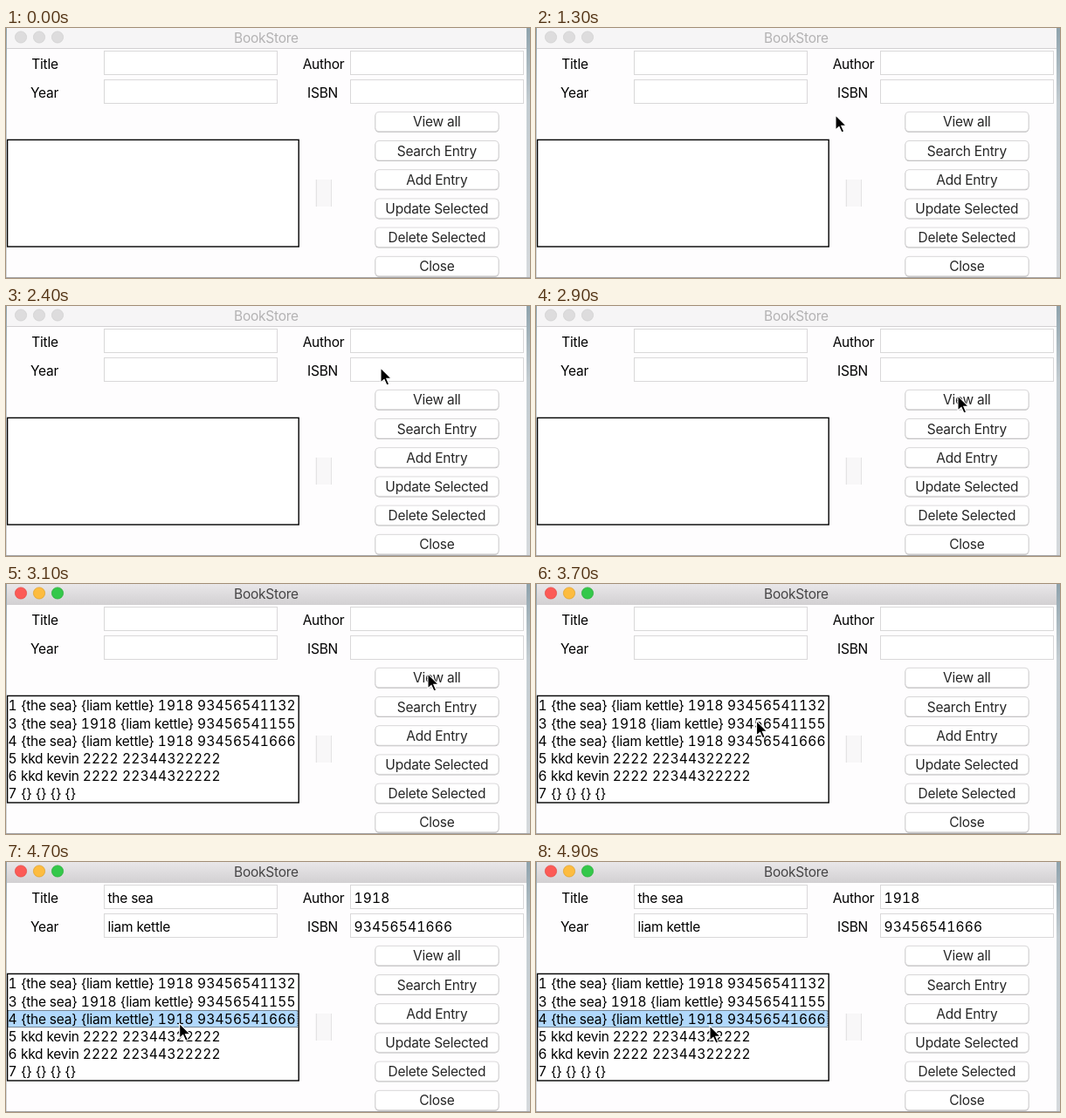
These frames come from a looping animation (600x287 px, 5 s). An HTML page:

```html
<!DOCTYPE html>
<html lang="en">
<head>
<meta charset="utf-8">
<title>BookStore</title>
<style>
  html, body { margin: 0; width: 100%; height: 100%; overflow: hidden; background: #fefdfe; }
  svg { display: block; width: 100%; height: 100%; }
  text { font: 15.5px Inter, Roboto, sans-serif; letter-spacing: -.25px; fill: #000; }
  .num { font-feature-settings: "tnum"; letter-spacing: .2px; }
  .mid { text-anchor: middle; }
  .entry { fill: #fff; stroke: #d9d8d9; }
  .button text { fill: #262626; }
</style>
</head>
<body>
<svg viewBox="0 0 600 287" xmlns="http://www.w3.org/2000/svg">
  <defs>
    <linearGradient id="bar" x2="0" y2="1"><stop stop-color="#e9e7e9"/><stop offset="1" stop-color="#d3d1d3"/></linearGradient>
    <linearGradient id="desk" x2="0" y2="1"><stop stop-color="#8fa3ad"/><stop offset=".3" stop-color="#c3ccd1"/><stop offset="1" stop-color="#d5d9dc"/></linearGradient>
  </defs>
  <rect width="600" height="287" fill="url(#desk)"/>
  <rect x="1" width="595" height="286" fill="#fefdfe"/>
  <rect y="286" width="600" height="1" fill="#a3a3a5"/>
  <rect id="top" x="1" width="595" height="23"/>
  <rect x="1" y="23" width="595" height="1" fill="#d2d0d2"/>
  <g id="lights"></g>
  <text id="caption" class="mid" x="298" y="16.5">BookStore</text>
  <g id="form"></g>
  <g id="values"></g>
  <path d="M354 174h19v31h-19z" fill="#f8f7f8"/>
  <path d="M355.5 174v31M372.5 174v31" stroke="#e4e3e4"/>
  <rect x="1.6" y="128.4" width="333.6" height="122.6" fill="#fff" stroke="#000" stroke-width="1.4"/>
  <g id="mark">
    <rect x="2.5" y="150.5" width="331.5" height="19" fill="#b1d8fc" stroke="#17222c" stroke-dasharray="1 1"/>
  </g>
  <g id="list"></g>
  <path id="cursor" d="M0 0V17L4 13.4L7 20L9.7 18.8L6.8 12.4H12.3Z" fill="#000" stroke="#fff" stroke-width="1.1"/>
</svg>
<script>
const $ = id => document.getElementById(id);
const LOOP = 5000, STEP = 100;
const ACTIVE = 3000, LISTED = 3100, FIRST = 4000, SECOND = 4500;

const text = (x, y, s, cls = '') =>
  `<text class="${cls}" x="${x}" y="${y}">${s.replace(/\d+/g, '<tspan class="num">$&</tspan>')}</text>`;

const slots = [[112, 27], [394, 27], [112, 60], [394, 60]];
const labels = [['Title', 44.5, 46.5], ['Author', 363.5, 46.5], ['Year', 44, 79.7], ['ISBN', 362.5, 79.7]];
const buttons = ['View all', 'Search Entry', 'Add Entry', 'Update Selected', 'Delete Selected', 'Close'];
const rows = [
  '1 {the sea} {liam kettle} 1918 93456541132',
  '3 {the sea} 1918 {liam kettle} 93456541155',
  '4 {the sea} {liam kettle} 1918 93456541666',
  '5 kkd kevin 2222 22344322222',
  '6 kkd kevin 2222 22344322222',
  '7 {} {} {} {}'
];
const records = [
  ['the sea', 'liam kettle', '1918', '93456541155'],
  ['the sea', '1918', 'liam kettle', '93456541666']
];

// pointer tip: time, x, y
const path = [
  [0, 640, 262], [100, 594, 236], [300, 480, 168], [500, 368, 96], [600, 348, 86],
  [800, 352, 121], [1000, 347, 56], [1200, 339, 90], [1300, 343, 100], [1500, 332, 96],
  [1800, 316, 85], [2000, 285, 95], [2200, 350, 61], [2400, 429, 71], [2700, 470, 95],
  [2900, 483, 103], [3100, 483, 103], [3300, 440, 118], [3600, 290, 150], [3800, 215, 164],
  [4000, 202, 158], [4100, 202, 158], [4200, 200, 176], [4500, 198, 180], [4800, 199, 188], [5000, 199, 188]
];

$('form').innerHTML =
  slots.map(([x, y]) => `<rect class="entry" x="${x + .5}" y="${y - .5}" width="198" height="27"/>`).join('') +
  labels.map(([s, x, y]) => text(x, y, s, 'mid')).join('') +
  buttons.map((s, i) => {
    const y = 95.8 + i * 33.2;
    return `<g class="button"><rect x="422.5" y="${y + .6}" width="142" height="23.4" rx="4.5" fill="#bcbbbc"/>
      <rect x="423" y="${y + .5}" width="141" height="22.5" rx="4" fill="#fff" stroke="#d3d2d3" stroke-width=".8"/>
      ${text(493.3, y + 17.5, s, 'mid')}</g>`;
  }).join('');
$('list').innerHTML = rows.map((s, i) => text(2.5, 145.3 + i * 20.2, s)).join('');
$('lights').innerHTML = [17, 38, 59].map(x => `<circle cx="${x}" cy="10.5" r="6.6"/>`).join('');

function pointer(t) {
  const i = path.findIndex(p => p[0] > t);
  const [t0, x0, y0] = path[i - 1], [t1, x1, y1] = path[i];
  const k = (t - t0) / (t1 - t0);
  return [x0 + (x1 - x0) * k, y0 + (y1 - y0) * k];
}

const show = (id, on) => $(id).setAttribute('visibility', on ? 'visible' : 'hidden');
let shown = -2;

function fillEntries(pick) {
  if (pick === shown) return;
  shown = pick;
  $('values').innerHTML = pick < 0 ? '' :
    records[pick].map((s, i) => text(slots[i][0] + 4.5, slots[i][1] + 19.5, s)).join('');
}

function draw(now) {
  const t = Math.floor(now % LOOP / STEP) * STEP;
  const active = t >= ACTIVE;
  const pick = t >= SECOND ? 1 : t >= FIRST ? 0 : -1;
  $('top').setAttribute('fill', active ? 'url(#bar)' : '#f6f5f6');
  $('caption').style.fill = active ? '#454445' : '#b3b2b3';
  [...$('lights').children].forEach((c, i) => {
    c.setAttribute('fill', active ? ['#fc5b57', '#fdbc40', '#34c84a'][i] : '#dddcdd');
    c.setAttribute('stroke', active ? ['#e2463f', '#dfa023', '#27aa35'][i] : '#cfcecf');
    c.setAttribute('stroke-width', .7);
  });
  show('list', t >= LISTED);
  show('mark', pick >= 0);
  $('mark').setAttribute('transform', `translate(0 ${pick > 0 ? 20 : 0})`);
  fillEntries(pick);
  $('cursor').setAttribute('transform', `translate(${pointer(t)})`);
}

const start = performance.now();
function tick() {
  draw(performance.now() - start);
  requestAnimationFrame(tick);
}
tick();
</script>
</body>
</html>
```
